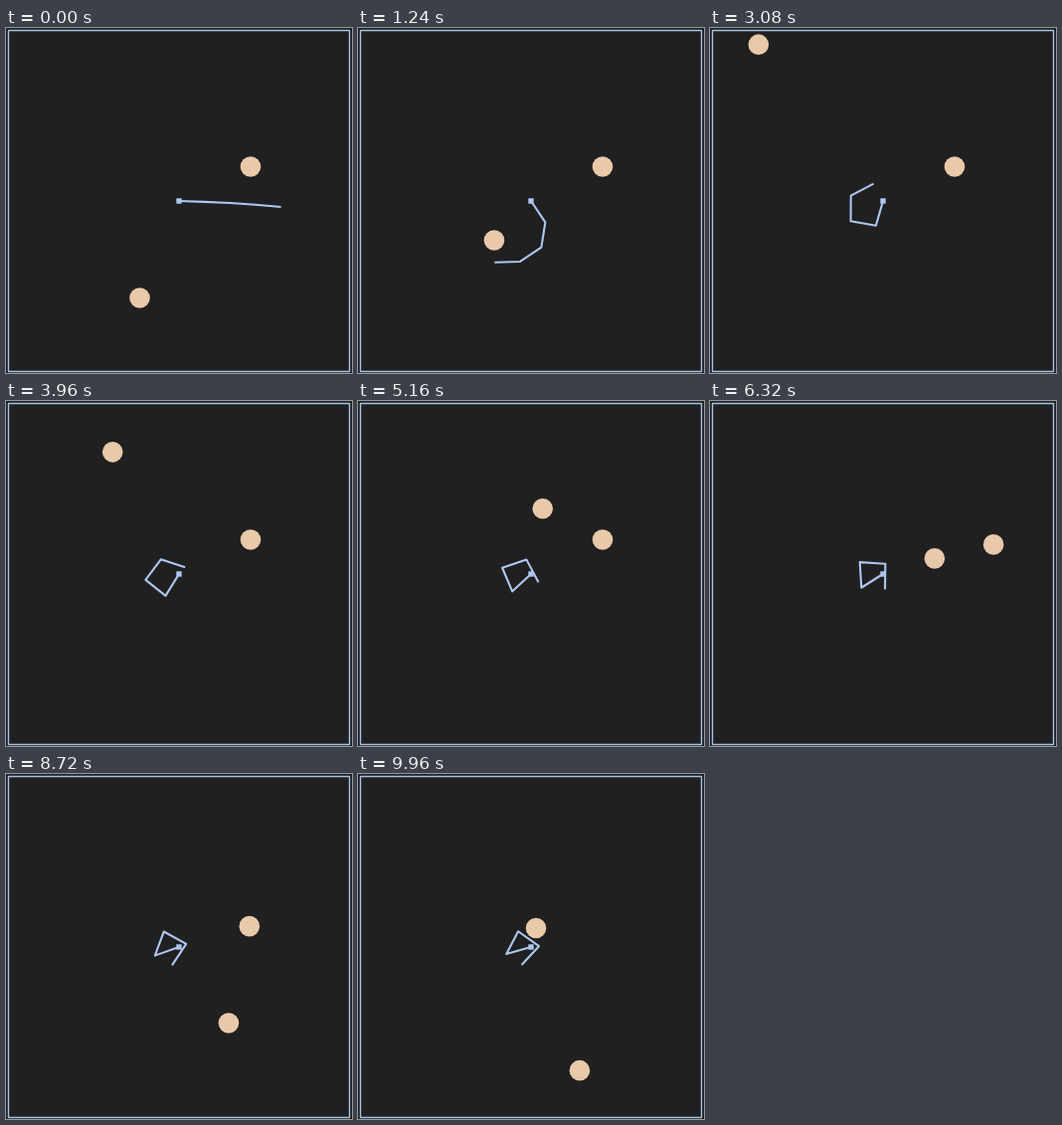
Animation of 348 by 347 pixels, one loop 10 s. Source, as an HTML page with a canvas:

```html
<!DOCTYPE html>
<html>
<head>
<meta charset="utf-8">
<style>
html, body { margin: 0; width: 100%; height: 100%; overflow: hidden; background: #202020; }
canvas { display: block; }
</style>
</head>
<body>
<canvas id="stage" width="348" height="347"></canvas>
<script>
const ctx = document.getElementById("stage").getContext("2d");
const LOOP = 10000, STEP = 40;
const ANCHOR = 174, LINK = 25.7, RADIUS = 10.3;
const BLUE = "#adc7ef", EDGE = "#a3c2e4", SAND = "#e8c9a9";

// Every link turns from nearly straight towards its final heading (degrees),
// slowing down exponentially with its own time constant (seconds).
const links = [
  { from: 2, to: 172, settle: 3.25 },
  { from: 2.5, to: 313, settle: 3.33 },
  { from: 4, to: 408, settle: 2.86 },
  { from: 5, to: 510, settle: 2.95 }
];

// Balls drift in straight lines between impacts
const at = (t, x, y) => ({ t, x, y });
const striker = [
  at(0, 134.5, 271.5),
  at(1.3, 137.1, 210.7),   // flicked by the chain
  at(2.625, 12.6, 46),     // left wall
  at(3.143, 53.8, 12.6),   // top wall
  at(5.78, 226.3, 137.6),  // hits the other ball
  at(10, 222.9, 299.7)
];
const resting = [
  at(0, 246, 139.5),
  at(5.78, 246, 139.5),
  at(7.013, 335.4, 150.7), // right wall
  at(10, 176.9, 155)
];

function drift(path, t) {
  const next = path.findIndex(p => p.t > t);
  const a = path[next - 1], b = path[next];
  const k = (t - a.t) / (b.t - a.t);
  return { x: a.x + (b.x - a.x) * k, y: a.y + (b.y - a.y) * k };
}

function heading({ from, to, settle }, t) {
  const degrees = to + (from - to) * Math.exp(-t / settle);
  return degrees * Math.PI / 180;
}

function drawBall({ x, y }) {
  ctx.fillStyle = SAND;
  ctx.beginPath();
  ctx.arc(x, y, RADIUS, 0, Math.PI * 2);
  ctx.fill();
}

function drawChain(t) {
  let x = ANCHOR, y = ANCHOR;
  ctx.strokeStyle = ctx.fillStyle = BLUE;
  ctx.lineWidth = 2.1;
  ctx.lineJoin = "round";
  ctx.beginPath();
  ctx.moveTo(x, y);
  for (const link of links) {
    const angle = heading(link, t);
    x += LINK * Math.cos(angle);
    y += LINK * Math.sin(angle);
    ctx.lineTo(x, y);
  }
  ctx.stroke();
  ctx.fillRect(ANCHOR - 2.7, ANCHOR - 2.7, 5.4, 5.4);
}

function render(t) {
  ctx.fillStyle = "#202020";
  ctx.fillRect(0, 0, 348, 347);
  ctx.strokeStyle = EDGE;
  ctx.lineWidth = 1.4;
  ctx.strokeRect(2.5, 2.5, 343, 343);
  drawChain(t);
  drawBall(drift(striker, t));
  drawBall(drift(resting, t));
}

const start = performance.now();
function tick() {
  const elapsed = Math.max(0, performance.now() - start) % LOOP;
  render(Math.floor(elapsed / STEP) * STEP / 1000);
  requestAnimationFrame(tick);
}
tick();
</script>
</body>
</html>
```
